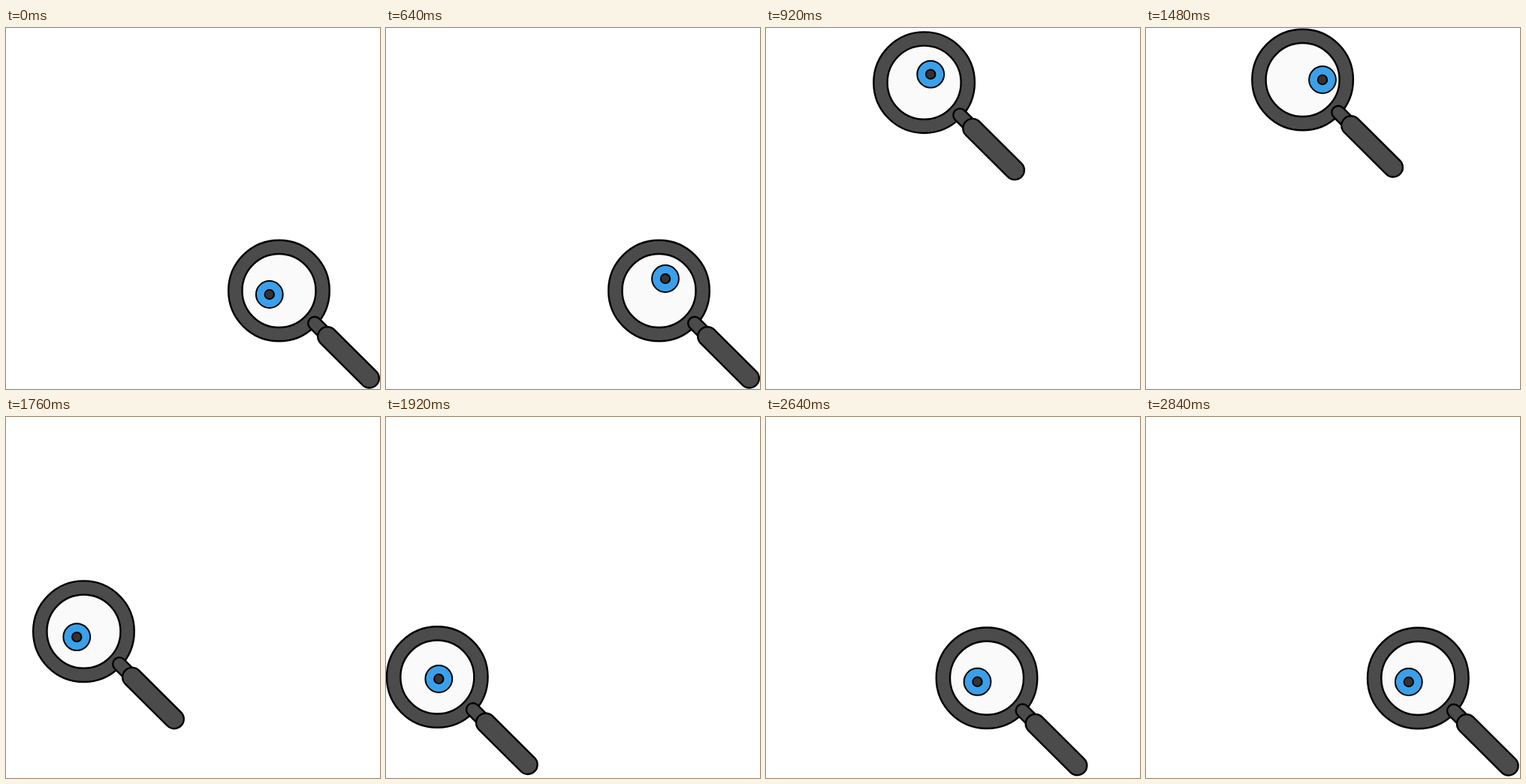
Recreate the animation shown at these times as an HTML page. Size 498 by 481 pixels, loop 2.88 s.

```html
<!DOCTYPE html>
<html lang="en">
<head>
<meta charset="utf-8">
<title>Searching eye</title>
<style>
  html, body { margin: 0; width: 100%; height: 100%; overflow: hidden; background: #fff; }
  svg { display: block; }
</style>
</head>
<body>
<svg width="498" height="481" viewBox="0 0 498 481">
  <g id="glass" stroke="#000" stroke-width="2.4" stroke-linecap="round" fill="#4b4b4b">
    <circle r="67.3"/>
    <circle r="49" fill="#fafafa"/>
    <g id="eye">
      <circle r="17.9" fill="#3aa0ea" stroke-width="2"/>
      <circle r="6.2" fill="#333" stroke-width="2"/>
    </g>
    <path d="M47.5 43.5L59 55" stroke-width="20"/>
    <path d="M47.5 43.5L59 55" stroke="#4b4b4b" stroke-width="15.2"/>
    <path d="M64.5 61L120.5 116.7" stroke-width="28"/>
    <path d="M64.5 61L120.5 116.7" stroke="#4b4b4b" stroke-width="23.2"/>
  </g>
</svg>
<script>
const LOOP = 2880, STEP = 40;
const glass = document.getElementById('glass');
const eye = document.getElementById('eye');

// Quick start, long soft landing; one entry per step
const GLIDE = [0, .061, .28, .567, .768, .88, .95, .987, .998, 1];

// start time, from, to, sideways bow of the path
const moves = [
  [640, [363.5, 350], [208.6, 69], [0, 0]],
  [1600, [208.6, 69], [68, 347], [16, 18]],
  [2480, [68, 347], [362.3, 348], [0, 0]]
];

// time, x, y inside the lens, glide on to the next key
const looks = [
  [0, -12.7, 5, false],
  [360, -5.7, 4.5, false],
  [640, 8.5, -16, true],
  [920, 8.6, -11, true],
  [1480, 26.4, 0, true],
  [1760, -9.2, 7.4, true],
  [1920, 2, 2.5, false],
  [2200, -12.5, 5, false]
];

const mix = (a, b, f) => a + (b - a) * f;
const smooth = f => f * f * (3 - 2 * f);
const place = (node, x, y) => node.setAttribute('transform', `translate(${x} ${y})`);

function lensAt(t) {
  const [start, from, to, bow] = moves.findLast(m => t >= m[0]) || moves[0];
  const f = GLIDE[Math.max(0, Math.min(9, (t - start) / STEP))];
  return [0, 1].map(i => mix(from[i], to[i], f) + bow[i] * f * (1 - f));
}

function eyeAt(t) {
  const i = looks.findLastIndex(k => t >= k[0]);
  const [start, x, y, glides] = looks[i];
  if (!glides) return [x, y];
  const [end, nx, ny] = looks[i + 1];
  const f = smooth((t - start) / (end - start));
  return [mix(x, nx, f), mix(y, ny, f)];
}

const begin = performance.now();
function draw(now) {
  const t = Math.floor(Math.max(0, now - begin) % LOOP / STEP) * STEP;
  place(glass, ...lensAt(t));
  place(eye, ...eyeAt(t));
  requestAnimationFrame(draw);
}
draw(begin);
</script>
</body>
</html>
```
